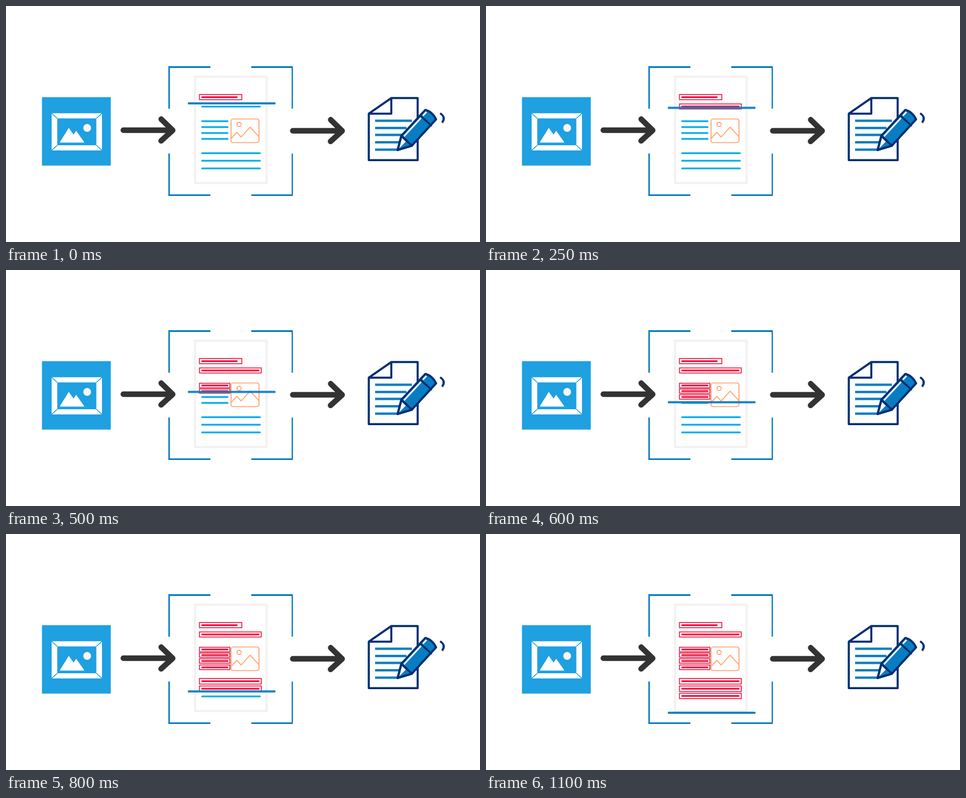
Write an HTML page that moves like this. It is 800 px wide and 400 px high and loops after 1300 ms.

```html
<!DOCTYPE html>
<html lang="en">
<head>
<meta charset="utf-8">
<title>Image to editable text</title>
<style>
  html, body { margin: 0; width: 100%; height: 100%; overflow: hidden; background: #fff; }
  svg { position: absolute; left: 0; top: 0; width: 800px; height: 400px; fill: none; }
  .found { position: absolute; left: 0; top: 0; width: 800px; overflow: hidden; animation: reveal 1300ms step-end infinite; }
  .bar { animation: scan 1300ms infinite; }

  /* The bar advances in 50 ms ticks. */
  @keyframes scan {
    0%      { transform: translateY(165px);   animation-timing-function: steps(5); }
    19.23%  { transform: translateY(172.6px); animation-timing-function: steps(5); }
    38.46%  { transform: translateY(206.6px); animation-timing-function: steps(1); }
    42.3%   { transform: translateY(212.2px); animation-timing-function: steps(3); }
    53.84%  { transform: translateY(248px);   animation-timing-function: steps(2); }
    61.53%  { transform: translateY(266.8px); animation-timing-function: steps(4); }
    76.92%  { transform: translateY(272.5px); animation-timing-function: steps(2); }
    84.61%, 100% { transform: translateY(303px); }
  }
  /* A row turns red as the bar passes its middle. */
  @keyframes reveal {
    0%     { height: 162px; }
    15.38% { height: 180px; }
    34.61% { height: 201px; }
    38.46% { height: 210.4px; }
    46.15% { height: 220.4px; }
    50%    { height: 235px; }
    57.69% { height: 256px; }
    61.53% { height: 268.6px; }
    80.76%, 100% { height: 285px; }
  }
</style>
</head>
<body>
<svg viewBox="0 0 800 400">
  <defs>
    <g id="arrow" stroke="#333" stroke-width="9.4" stroke-linecap="round" stroke-linejoin="round">
      <path d="M198 210.5H280M262 191.8L281.3 210.7L261.8 228.5"/>
    </g>
  </defs>

  <!-- picture tile -->
  <path fill="#1ea0e1" d="M60.7 154.5H176.8V270.5H60.7Z"/>
  <path fill="#fff" fill-rule="evenodd" d="M77 181.8H162V244.8H77ZM86.5 190.5V236H152.5V190.5Z"/>
  <path stroke="#1ea0e1" stroke-width="1.4" d="M77 181.8L86.5 190.5M162 181.8L152.5 190.5M77 244.8L86.5 236M162 244.8L152.5 236"/>
  <path fill="#fff" d="M90.5 231.5L106 206.5L114 218L118.5 211.5L132.5 231.5Z"/>
  <circle cx="137" cy="206.7" r="6.6" fill="#fff"/>

  <use href="#arrow"/>
  <use href="#arrow" x="286" y="1"/>

  <!-- viewfinder and page -->
  <g stroke="#0a7dc2">
    <path stroke-width="3" d="M345 103.5H274M414 103.5H484"/>
    <path stroke-width="2.6" d="M345 320.6H274M414 320.6H484M275.3 103V174M275.3 250V321"/>
    <path stroke-width="2.2" d="M483.2 103V174M483.2 250V321"/>
  </g>
  <path stroke="#f2f2f2" stroke-width="4" d="M319.2 120H439.8V300H319.2Z"/>

  <g stroke="#00aee9" stroke-width="3" stroke-linecap="round">
    <path d="M331 170.4H428.5M331 249.5H428.5M331 262.3H428.5M331 275.2H428.5"/>
    <path d="M331 195.2H374M331 205.3H374M331 215.2H374M331 225.2H374"/>
  </g>
  <g stroke="#ffa473" stroke-width="1.7" stroke-linejoin="round">
    <rect x="379.8" y="191.5" width="47.2" height="40" rx="3.5"/>
    <circle cx="393.4" cy="200.7" r="3.6"/>
    <path d="M380.5 224L389.7 214L396.8 222L412 205.2L426.8 221.5"/>
  </g>

  <!-- written document -->
  <g stroke="#002e74" stroke-width="3.5" stroke-linejoin="round" stroke-linecap="round">
    <path d="M650.3 156H694.8V261.3H612.3V182.5ZM650.3 156V182.5H612.3"/>
    <path stroke="#0a7dc2" stroke-width="4" stroke-linecap="butt" d="M623 194.6H685M623 206.8H676M623 218.6H668M623 231H664M623 243.4H661"/>
    <path fill="#fff" d="M661 244L667.3 220L685 236.8Z"/>
    <path fill="#0a7dc2" stroke="none" d="M662.5 242.5L676 228.5L684 236.5Z"/>
    <path fill="#0a7dc2" d="M667.3 220L707.8 176Q720 179.5 726 192L685 236.8Z"/>
    <path stroke="#fff" stroke-width="2.6" stroke-linecap="butt" d="M671.5 221L700.5 189.5M703.5 186L709.5 179.5"/>
    <path d="M661 244L667.3 220L685 236.8ZM699 185.5L717.5 202.3"/>
    <path d="M733.8 182.5Q742 189 736.8 196.5"/>
  </g>
</svg>

<div class="found">
  <svg viewBox="0 0 800 400">
    <g id="rows" fill="#fff" stroke="#f3123f"></g>
  </svg>
</div>

<svg viewBox="0 0 800 400">
  <path class="bar" stroke="#0a7dc2" stroke-width="3.3" stroke-linecap="round" d="M308.3 0H453.5"/>
</svg>

<script>
  // Each row: top, height, right edge of box, right end of text.
  const rows = [
    [150, 8.8, 398, 389.5], [166, 8.6, 430.8, 426.5],
    [192, 7.6, 377.8, 374], [201.6, 7.2, 377.8, 374],
    [211.4, 7.6, 377.8, 374], [222, 7.8, 377.8, 374],
    [244.8, 9.6, 430.8, 426.5], [257.6, 9.4, 430.8, 426.5], [270, 9, 430.8, 426.5]
  ];
  document.getElementById('rows').innerHTML = rows.map(([y, h, right, end]) =>
    `<rect x="326.5" y="${y}" width="${right - 326.5}" height="${h}" stroke-width="1.5"/>
     <path d="M331 ${y + h / 2}H${end}" stroke-width="3" stroke-linecap="round"/>`).join('');
</script>
</body>
</html>
```
